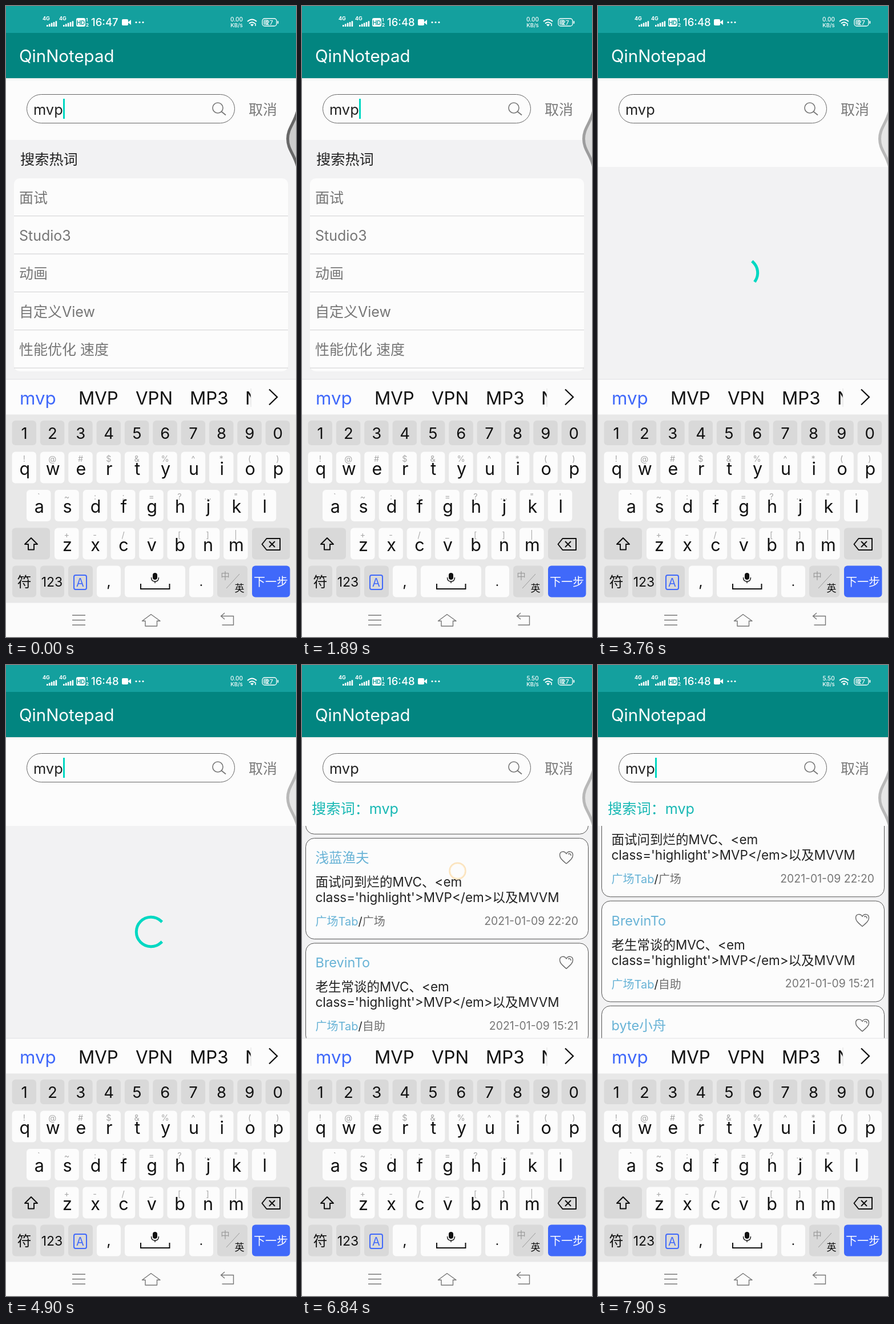
An HTML page for the animation above (8000 ms loop, 508 px wide and 1102 px high).

```html
<!DOCTYPE html>
<html lang="zh">
<head>
<meta charset="utf-8">
<style>
  html, body { margin: 0; width: 100%; height: 100%; overflow: hidden; background: #fcfcfc; }
  svg { display: block; }
  text { font-family: Inter, "Noto Sans CJK SC", "Noto Sans CJK", sans-serif; white-space: pre; }
</style>
</head>
<body>
<script>
const LOOP = 8000, LOADING = 2780, RESULTS = 5140;
const TEAL = '#00d8c2', BLUE = '#4069fa', KEY = '#d9d9d9', WHITE = '#fcfcfc';

const esc = s => s.replace(/&/g, '&amp;').replace(/</g, '&lt;');
const text = (x, y, size, fill, s, extra = '') =>
  `<text x="${x}" y="${y}" font-size="${size}" fill="${fill}" ${extra}>${esc(s)}</text>`;
const mid = (x, y, size, fill, s, extra = '') => text(x, y, size, fill, s, 'text-anchor="middle" ' + extra);
const rect = (x, y, w, h, fill, r = 0, extra = '') =>
  `<rect x="${x}" y="${y}" width="${w}" height="${h}" rx="${r}" fill="${fill}" ${extra}/>`;
const line = (d, color, w = 1.5, extra = '') =>
  `<path d="${d}" fill="none" stroke="${color}" stroke-width="${w}" ${extra}/>`;
const times = (n, fn) => Array.from({ length: n }, (_, i) => fn(i)).join('');

function statusBar() {
  const signal = x => text(x, 25, 9, '#fff', '4G', 'font-weight="700"') +
    times(5, i => rect(x + 7 + i * 3.9, 33 - i * 1.7, 2.6, 3 + i * 1.7, '#fff', .6));
  return rect(0, 0, 508, 47, '#14a09e') + signal(64) + signal(93) +
    rect(123, 21, 16, 15, '#fff', 3) + mid(131, 32.5, 10, '#14a09e', 'HD', 'font-weight="700"') +
    text(140, 27, 8, '#fff', '1', 'font-weight="700"') + text(140, 36, 8, '#fff', '2', 'font-weight="700"') +
    text(149, 35, 18.5, '#fff', '16:47', 'id="clock" font-weight="500"') +
    rect(203, 23, 11, 11, '#fff', 2) + '<path d="M214 28l5-4v9l-5-4z" fill="#fff"/>' +
    times(3, i => `<circle cx="${228 + i * 6}" cy="28.5" r="1.6" fill="#fff"/>`) +
    mid(404, 27, 10, '#fff', '0.00', 'id="speed" font-weight="500"') +
    mid(404, 37, 9.5, '#fff', 'KB/s', 'font-weight="500"') +
    line('M423 27q8-7 16 0M426 30.500q5-4.500 10 0', '#fff', 2) +
    '<path d="M428 32.500q3-2 6 0l-3 3z" fill="#fff"/>' + line('M437 30v5', '#fff', 1.5) +
    rect(449, 22, 25, 13, 'none', 4, 'stroke="#fff" stroke-width="1.3"') +
    rect(451, 24, 8, 9, '#fff', 2, 'opacity=".55"') + rect(475.5, 26, 1.8, 5, '#fff', 1) +
    mid(461.5, 32.5, 10.5, '#fff', '27', 'font-weight="500"');
}

function searchBar() {
  return rect(0, 47, 508, 79, '#028580') + text(23, 98, 29.5, '#fff', 'QinNotepad') +
    rect(0, 126, 508, 2, '#eceeee') + rect(0, 128, 508, 3, '#f7f8f8') +
    rect(36.5, 154.5, 364, 50, WHITE, 25, 'stroke="#666"') +
    text(48, 190, 25.4, '#222', 'mvp') + rect(100, 162, 3, 35, TEAL, 0, 'id="cursor"') +
    '<circle cx="371" cy="178" r="9" fill="none" stroke="#777" stroke-width="1.600"/>' +
    line('M377.500 184.500l7.500 6', '#777', 1.8) + text(425, 190, 25, '#7b7b7b', '取消');
}

function hotWords() {
  const words = ['面试', 'Studio3', '动画', '自定义View', '性能优化 速度'];
  return rect(0, 126, 508, 108, WHITE) + text(25, 277, 25.2, '#222', '搜索热词') +
    rect(14, 301, 480, 337, WHITE, 10) +
    words.map((w, i) => text(23, 343.5 + i * 66.4, 25, '#767676', w) +
      rect(14, 366 + i * 66.4, 480, 1.2, '#d6d6d8')).join('');
}

function card([name, first, second, tag, kind, date], i) {
  return `<g transform="translate(0 ${287 + i * 183.3})">` +
    rect(6.5, .5, 495, 176, WHITE, 15, 'stroke="#555"') +
    text(23.5, 43, 23.5, '#68b3d6', name) +
    line('M463 45C455 38 451.500 35 451.500 30C451.500 23 459.500 22 463 27.500C466.500 22 474.500 23 474.500 30C474.500 35 471 38 463 45M466 28q5-2 5 3', '#666', 1.4) +
    text(23.5, 85, 22.5, '#222', first) + text(23.5, 112, 22.5, '#222', second) +
    `<text x="23.500" y="153" font-size="20" fill="#68b3d6">${tag}<tspan fill="#222">/</tspan><tspan fill="#707070">${kind}</tspan></text>` +
    text(484, 151.5, 19.4, '#777', date, 'text-anchor="end"') + '</g>';
}

function results() {
  const tail = "class='highlight'>MVP</em>以及MVVM";
  const cards = [
    ['lintaobei', "flutter搭建<em class='highlight'>mvp</", 'em>框架', '开源项目主Tab', '未分类', '2021-01-26 00:02'],
    ['浅蓝渔夫', '面试问到烂的MVC、<em', tail, '广场Tab', '广场', '2021-01-09 22:20'],
    ['BrevinTo', '老生常谈的MVC、<em', tail, '广场Tab', '自助', '2021-01-09 15:21'],
    ['byte小舟', '', '', '', '', ''],
  ];
  return text(17, 260, 25.2, '#18b8b4', '搜索词：mvp') +
    '<svg y="281" width="508" height="371" viewBox="0 281 508 371"><g id="list">' +
    cards.map(card).join('') + '</g></svg>' +
    '<g id="touch" fill="none"><circle r="14" stroke="#fbe3bd" stroke-width="2.500"/><circle r="12.500" stroke="#fff3dc"/></g>';
}

function keyRow(letters, hints, x, y) {
  return [...letters].map((c, i) => {
    const left = x + i * 49.35, cx = left + 21.3;
    return rect(left, y, 42.5, 55, WHITE, 6) + mid(cx, y + 17, 14.5, '#aaa', hints[i]) +
      mid(cx + 1, y + 40, 30.5, '#111', c);
  }).join('');
}

function keyboard() {
  const candidates = [[24, 'mvp', BLUE], [127, 'MVP'], [227, 'VPN'], [322, 'MP3']];
  const bottom = [[11, 42, KEY], [60, 42, KEY], [109, 43, KEY], [159, 42, WHITE], [208, 106, WHITE],
    [321, 42, WHITE], [370, 53, KEY], [431, 66.5, BLUE]];
  return rect(0, 652, 508, 62, WHITE) + rect(0, 651.5, 508, 1, '#e2e2e4') +
    candidates.map(([x, s, c = '#111']) => text(x, 696, 31.3, c, s)).join('') +
    '<svg x="410" y="660" width="19" height="48">' + text(9, 36, 31.3, '#111', 'N') + '</svg>' +
    rect(428.5, 668, 1, 32, '#ddd') + line('M461 669.500l14 13.500l-14 13.500', '#111', 2.3) +
    rect(0, 713.5, 508, 329, '#e8e8e8') +
    times(10, i => rect(10.5 + i * 49.35, 724, 42.5, 43, KEY, 6) +
      mid(32 + i * 49.35, 755.5, 27.5, '#111', String((i + 1) % 10))) +
    keyRow('qwertyuiop', '!@#$&%^*()', 10.5, 778.5) +
    keyRow('asdfghjkl', '`~:;=?…"\'', 36, 845) +
    keyRow('zxcvbnm', '+-/_[]|', 85, 911.5) +
    rect(10.5, 911.5, 66.5, 55, KEY, 6) + rect(431, 911.5, 66.5, 55, KEY, 6) +
    line('M44 929l11 11h-6v9.500h-10v-9.500h-6z', '#111', 2, 'stroke-linejoin="round"') +
    line('M456.500 930h23.500v20h-23.500l-8-10zM461 935l10 10m0-10l-10 10', '#111', 2, 'stroke-linejoin="round"') +
    bottom.map(([x, w, c]) => rect(x, 977.5, w, 55, c, 6)).join('') +
    mid(32, 1015, 25, '#111', '符') + mid(80.5, 1014, 23, '#111', '123') +
    rect(119, 994, 22, 25, 'none', 3, `stroke="${BLUE}" stroke-width="2"`) +
    mid(130, 1014, 20, BLUE, 'A') + mid(180, 1014, 26, '#111', ',') + mid(342, 1013, 22, '#111', '.') +
    rect(257, 990, 8, 12, '#111', 4) + line('M254.500 998q0 7 6.500 7t6.500-7M261 1005v3', '#111', 1.4) +
    line('M236 1009v9h50.500v-9', '#111', 2) +
    mid(384, 1001, 15.5, '#999', '中') + line('M386 1017l23-25', '#999', 1) + mid(409, 1023, 17, '#111', '英') +
    mid(464, 1012.5, 20, '#fff', '下一步') +
    rect(0, 1042.5, 508, 60, '#fbfbfb') +
    line('M116 1064h23m-23 8.500h23m-23 8.500h23', '#777', 1.4) +
    line('M244 1074h-5.500l15.500-11.500l16 11.500h-5.500v9h-20.500z', '#777', 1.4, 'stroke-linejoin="round"') +
    line('M383 1060l-6.500 5.500l6.500 5.500M376.500 1065.500h22v15.500h-20', '#777', 1.4);
}

document.body.innerHTML = `<svg width="508" height="1102" viewBox="0 0 508 1102">
  ${rect(0, 0, 508, 1102, '#f2f2f3')}
  ${rect(0, 126, 508, 155, WHITE)}
  <g id="hot">${rect(0, 234, 508, 50, '#f2f2f3')}${hotWords()}</g>
  <g id="found">${results()}</g>
  ${searchBar()}${statusBar()}
  <path id="spinner" fill="none" stroke="${TEAL}" stroke-width="5" stroke-linecap="square"/>
  <path id="bubble" d="M511 182C505 206 493.500 213 493.500 232S505 258 511 282" fill="#ccc" stroke="#686868" stroke-width="5"/>
  ${keyboard()}</svg>`;

const $ = id => document.getElementById(id);
const show = (id, on) => $(id).setAttribute('visibility', on ? 'visible' : 'hidden');
const clamp = x => Math.min(1, Math.max(0, x));

// Fast-out slow-in: cubic-bezier(.4, 0, .2, 1), solved by bisection.
function ease(x) {
  let lo = 0, hi = 1, u;
  for (let i = 0; i < 16; i++) {
    u = (lo + hi) / 2;
    if (1.2 * u * (1 - u) ** 2 + .6 * u * u * (1 - u) + u ** 3 < x) lo = u; else hi = u;
  }
  return u * u * (3 - 2 * u);
}

function spinnerPath(t) {
  const p = (t - 2745) / 1400 % 1;
  const turn = 57 + (t - 3760) * .2605 + 90 * p;
  const point = deg => {
    const a = deg * Math.PI / 180;
    return `${254 + 25.7 * Math.cos(a)} ${466 + 25.7 * Math.sin(a)}`;
  };
  const start = 270 * ease(clamp(2 * p - 1)), end = Math.max(start + 1, 270 * ease(clamp(2 * p)));
  return `M${point(turn + start)}A25.7 25.7 0 ${end - start > 180 ? 1 : 0} 1 ${point(turn + end)}`;
}

const blinks = [360, 870, 1375, 1880, 2385, 2890, 3390, 3890, 4390, 4890, 5470, 5980, 6490, 7730];

function draw(t) {
  const loading = t >= LOADING && t < RESULTS;
  show('hot', t < LOADING);
  show('found', t >= RESULTS);
  show('spinner', loading);
  show('cursor', blinks.filter(b => b <= t).length % 2 === 0);
  show('touch', t >= 6280 && t < 7240);
  if (loading) $('spinner').setAttribute('d', spinnerPath(t));

  // The finger starts slowly, pulls the list up, then lets it coast.
  const start = clamp((t - 6280) / 180) ** 2, pull = clamp((t - 6460) / 700), coast = clamp((t - 7160) / 400);
  const drag = pull * (1.6 - .6 * pull);
  const scroll = 31 * start + 198 * drag + 13 * coast * (2 - coast);
  $('list').setAttribute('transform', `translate(0 ${-scroll})`);
  $('touch').setAttribute('transform', `translate(${233 + 57 * drag} ${505 - 31 * start - 165 * drag})`);

  $('bubble').setAttribute('opacity', 1 - .55 * clamp(t / 2700));
  $('clock').textContent = t < 1000 ? '16:47' : '16:48';
  $('speed').textContent = t < 5540 ? '0.00' : '5.50';
}

function frame() {
  draw(performance.now() % LOOP);
  requestAnimationFrame(frame);
}
frame();
</script>
</body>
</html>
```
